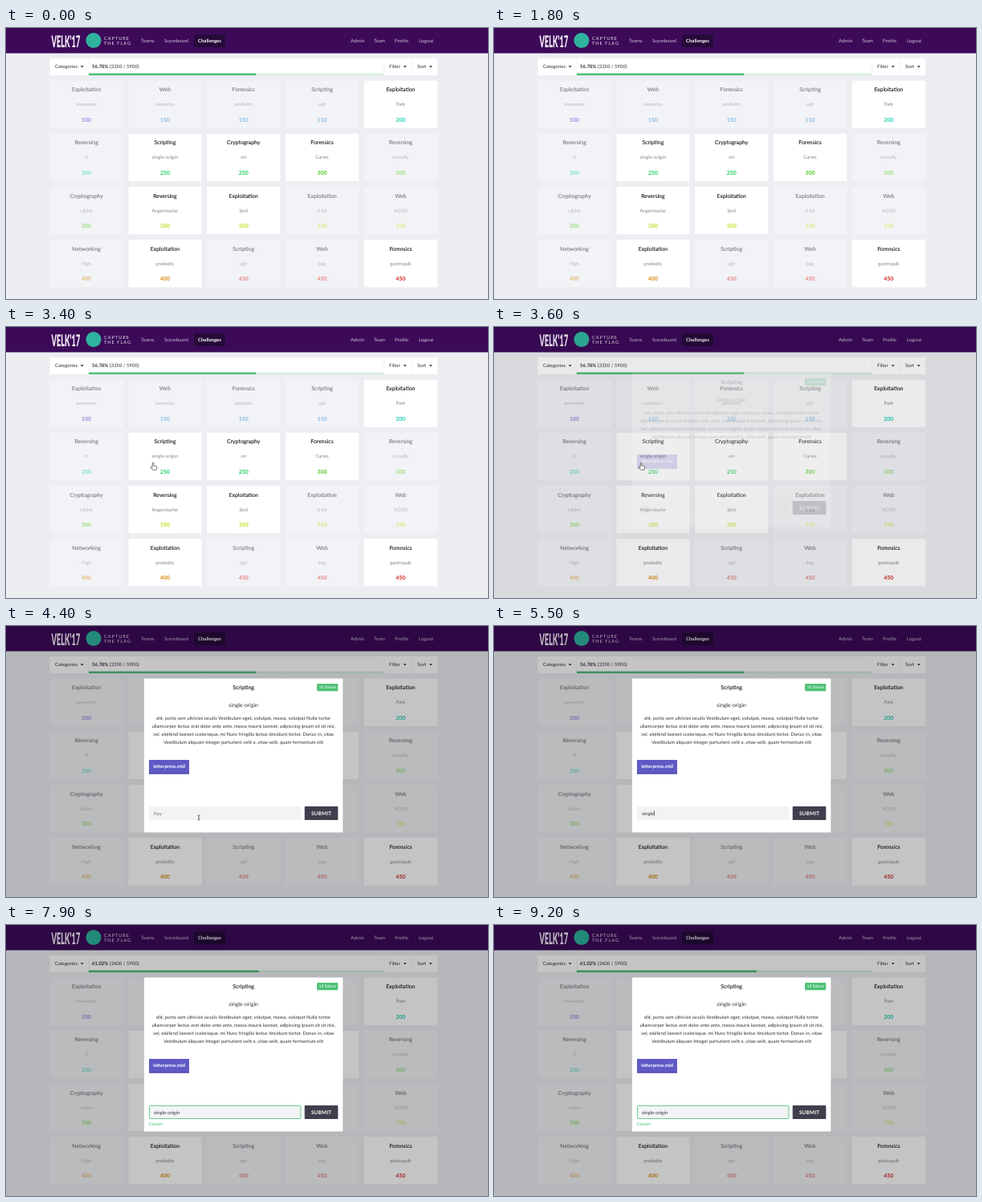
An HTML page for the animation above (9300 ms loop, 600 by 338 pixels).

```html
<!DOCTYPE html>
<html lang="en">
<head>
<meta charset="utf-8">
<title>Challenges</title>
<style>
html, body { margin: 0; width: 100%; height: 100%; overflow: hidden; background: #eceef2; }
svg { display: block; width: 600px; height: 338px; font: 6px Lato, sans-serif; fill: #333338; text-rendering: geometricPrecision; }
text { white-space: pre; }
.mid { text-anchor: middle; }
.bold { font-weight: 700; }
.nav { fill: #cdbfd6; }
.card { filter: drop-shadow(0 .4px .4px #0001); }
.dim { filter: none; }
.dim rect { opacity: .33; }
.dim text { opacity: .55; }
.title { font-size: 6.9px; fill: #1b1c22; stroke: #1b1c22; stroke-width: .12px; }
.sub { fill: #85858a; }
.points { font-size: 6.9px; font-weight: 700; }
.wordmark { font-size: 9.2px; font-weight: 900; fill: #f1e9f5; transform: translate(56.5px, 23.7px) scaleY(2.2); }
.tagline { font-size: 5.7px; letter-spacing: .95px; fill: #e4dbea; }

#fill, #shade, #modal, #cursor, #hand, #beam, #ok { animation: 9.3s linear infinite both; }
#fill { transform-box: fill-box; transform-origin: left; animation-name: fill; }
#shade { animation-name: shade; }
#modal { animation-name: modal; }
#cursor { animation-name: cursor; }
#hand { animation-name: hand; }
#beam { animation-name: beam; }
#ok { animation-name: ok; }

@keyframes fill {
  0%, 22.04% { transform: scaleX(.5678); }
  22.043% { transform: scaleX(0); animation-timing-function: ease; }
  28.495%, 83.871% { transform: scaleX(.5678); animation-timing-function: ease; }
  90.323%, 100% { transform: scaleX(.6102); }
}
@keyframes shade {
  0%, 37.634% { opacity: 0; }
  40.7%, 100% { opacity: 1; }
}
@keyframes modal {
  0%, 37.634% { opacity: 0; transform: translateY(-11px); }
  38.71% { opacity: .2; transform: translateY(-8px); }
  41.935%, 100% { opacity: 1; transform: none; }
}
@keyframes cursor {
  0%, 32.25% { opacity: 0; transform: translate(215px, 345px); }
  32.258% { opacity: 1; transform: translate(215px, 345px); animation-timing-function: ease-out; }
  36.559%, 40.86% { transform: translate(183px, 169px); animation-timing-function: ease-in-out; }
  46.237%, 52.68% { opacity: 1; transform: translate(240px, 239px); }
  52.688%, 68.81% { opacity: 0; transform: translate(238px, 241px); }
  68.817%, 83.865% { opacity: 1; transform: translate(238px, 241px); }
  83.871%, 100% { opacity: 0; transform: translate(238px, 241px); }
}
@keyframes hand { 0%, 43% { opacity: 1; } 43.01%, 100% { opacity: 0; } }
@keyframes beam { 0%, 43% { opacity: 0; } 43.01%, 100% { opacity: 1; } }
@keyframes ok { 0%, 83.865% { opacity: 0; } 83.871%, 100% { opacity: 1; } }
</style>
</head>
<body>
<svg viewBox="0 0 600 338">
  <rect width="600" height="338" fill="#eceef2"/>

  <rect width="600" height="31.5" fill="#3c0a59"/>
  <text class="wordmark">VELK'17</text>
  <circle cx="109" cy="15.5" r="9.5" fill="#2fb39f"/>
  <g class="tagline">
    <text x="122" y="15">CAPTURE</text>
    <text x="122" y="21">THE FLAG</text>
  </g>
  <rect x="234" y="8" width="39" height="16" rx="1" fill="#260a3a"/>
  <g class="nav">
    <text x="168" y="18">Teams</text>
    <text x="197" y="18">Scoreboard</text>
    <text x="239" y="18" class="bold" fill="#fff">Challenges</text>
    <text x="429" y="18">Admin</text>
    <text x="458" y="18">Team</text>
    <text x="484" y="18">Profile</text>
    <text x="514" y="18">Logout</text>
  </g>

  <rect x="54.5" y="38" width="482.5" height="21" fill="#fff"/>
  <path d="M103 38v21M470.5 38v21M505.5 38v21" stroke="#ebecef" stroke-width=".6"/>
  <text x="61" y="50.2">Categories</text>
  <text x="107" y="50.2"><tspan id="percent" class="bold"></tspan><tspan id="score"></tspan></text>
  <text x="477" y="50.2">Filter</text>
  <text x="512" y="50.2">Sort</text>
  <path d="M92.7 47.2h4l-2 2.2zM494.7 47.2h4l-2 2.2zM526.7 47.2h4l-2 2.2z"/>
  <rect x="103" y="56.6" width="367" height="2.4" fill="#d3efdb"/>
  <rect id="fill" x="103" y="56.6" width="367" height="2.4" fill="#4fbd78"/>

  <g id="cards" class="mid"></g>

  <rect id="shade" width="600" height="338" fill="#000" fill-opacity=".23"/>

  <g id="modal">
    <rect x="172" y="65.5" width="247.3" height="192" fill="#fff"/>
    <g class="mid">
      <text x="295.6" y="79" class="title">Scripting</text>
      <rect x="387" y="72" width="26.3" height="9.2" rx="1" fill="#4fc276"/>
      <text x="400.2" y="78.4" font-size="5.1" fill="#fff">14 Solves</text>
      <text x="295.6" y="101.3" font-size="6.8">single-origin</text>
      <g id="body" font-size="5.9"></g>
      <rect x="178" y="167" width="50" height="17.5" fill="#5f59c6"/>
      <rect x="178" y="183.4" width="50" height="1.1" fill="#4a459f"/>
      <text x="203" y="177.3" class="bold" fill="#fff">letterpress.mid</text>
    </g>
    <rect x="178" y="225" width="189.5" height="17" fill="#f3f3f5"/>
    <text id="key" x="184" y="235.6"></text>
    <rect id="caret" y="230" width=".6" height="7.4" fill="#222"/>
    <rect x="371.7" y="225" width="41.6" height="17" rx="1" fill="#403f4e"/>
    <text x="392.6" y="235.9" class="mid bold" font-size="6.4" letter-spacing=".2" fill="#fff">SUBMIT</text>
    <g id="ok">
      <rect x="178.5" y="225.5" width="188.5" height="16" rx=".8" fill="none" stroke="#66cd8d"/>
      <text x="178" y="249.7" font-size="5.2" fill="#2db55d">Correct</text>
    </g>
  </g>

  <g id="cursor">
    <path id="hand" d="M-.8.6q.8-1 1.6 0v3.2l3 .7q1 .3.9 1.3l-.6 3.4h-4.7l-2.4-3.4q.5-1 1.4-.2l.8.7z" fill="#fff" stroke="#222" stroke-width=".6"/>
    <path id="beam" d="M-1.4-3q1.4 0 1.4.8v4.4q0 .8-1.4.8M1.4-3Q0-3 0-2.2M0 2.2q0 .8 1.4.8" fill="none" stroke="#222" stroke-width=".7"/>
  </g>
</svg>

<script>
const $ = id => document.getElementById(id);

// A star marks an open challenge
const cards = `Exploitation,scenester,100 Web,semiotics,150 Forensics,aesthetic,150 Scripting,ugh,150 *Exploitation,Park,200
Reversing,it,200 *Scripting,single-origin,250 *Cryptography,on,250 *Forensics,Caries,300 Reversing,actually,300
Cryptography,cliche,300 *Reversing,fingerstache,350 *Exploitation,bird,350 Exploitation,8-bit,350 Web,XOXO,350
Networking,High,400 *Exploitation,probably,400 Scripting,ugh,450 Web,bag,450 *Forensics,gastropub,450`.split(/\s+/);

const colors = {
  100: '#4a35d0', 150: '#2c8be0', 200: '#1bcdb2', 250: '#18cf57',
  300: '#52c91c', 350: '#c5d91c', 400: '#d98a12', 450: '#d42424'
};

$('cards').innerHTML = cards.map((card, i) => {
  const [title, name, points] = card.replace('*', '').split(',');
  const x = 54.5 + i % 5 * 97.8, y = 65.5 + Math.floor(i / 5) * 66.2;
  return `<g class="card ${card[0] === '*' ? '' : 'dim'}" transform="translate(${x} ${y})">
    <rect width="91.3" height="59.4" fill="#fff"/>
    <text class="title" x="45.6" y="13.7">${title}</text>
    <text class="sub" x="45.6" y="31.8">${name}</text>
    <text class="points" x="45.6" y="51" fill="${colors[points]}">${points}</text></g>`;
}).join('');

$('body').innerHTML = [
  'elit, porta sem ultricies iaculis Vestibulum eget, volutpat, massa, volutpat Nulla tortor',
  'ullamcorper lectus erat dolor ante ante, massa mauris laoreet, adipiscing ipsum sit sit nisi,',
  'vel, eleifend laoreet scelerisque. mi Nunc fringilla lectus tincidunt tortor. Donec in, vitae',
  'Vestibulum aliquam Integer parturient velit a, vitae velit, quam fermentum elit'
].map((line, i) => `<text x="295.6" y="${117.1 + i * 10.1}">${line}</text>`).join('');

const LOOP = 9300, FOCUS = 4700, TYPE = 5000, STEP = 95, SOLVED = 7800;
const answer = 'single-origin';
const clock = $('fill').getAnimations()[0];

function draw() {
  const t = (clock.currentTime || 0) % LOOP;
  const solved = t >= SOLVED;
  $('percent').textContent = solved ? '61.02%' : '56.78%';
  $('score').textContent = solved ? ' (3600 / 5900)' : ' (3350 / 5900)';

  const count = Math.max(0, Math.min(answer.length, Math.floor((t - TYPE) / STEP) + 1));
  const key = $('key');
  key.textContent = count ? answer.slice(0, count) : 'Key';
  key.setAttribute('fill', count ? '#333338' : '#77777c');

  const typed = TYPE + STEP * answer.length;
  const blink = t < typed || (t - typed) % 1000 < 500;
  $('caret').setAttribute('x', 184.3 + (count ? key.getComputedTextLength() : 0));
  $('caret').style.opacity = t >= FOCUS && !solved && blink ? 1 : 0;
  requestAnimationFrame(draw);
}
draw();
</script>
</body>
</html>
```
